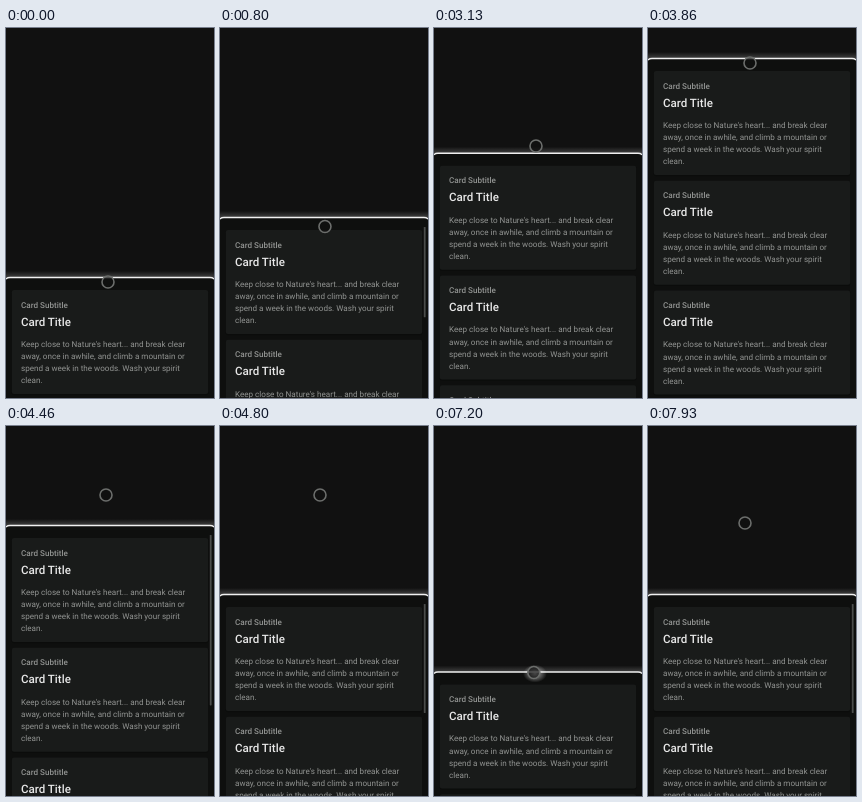
These frames come from a looping animation (208 px wide and 370 px high, 8000 ms). An HTML page:

```html
<!DOCTYPE html>
<html lang="en">
<head>
<meta charset="utf-8">
<title>Bottom sheet</title>
<style>
  html, body { margin: 0; width: 100%; height: 100%; overflow: hidden; background: #111; }
  svg { display: block; width: 208px; height: 370px; }
  text {
    font: 14px Roboto, "Open Sans", sans-serif;
    fill: #929492;
    text-rendering: geometricPrecision;
  }
  .sub { font-weight: 500; }
  .title { font-weight: 500; font-size: 20px; fill: #e8e8e8; }
</style>
</head>
<body>
<svg viewBox="0 0 208 370">
  <defs>
    <linearGradient id="edge" x1="0" y1="0" x2="0" y2="1">
      <stop offset="0" stop-color="#fff" stop-opacity="0"/>
      <stop offset="1" stop-color="#fff" stop-opacity=".2"/>
    </linearGradient>
    <radialGradient id="halo">
      <stop offset="0" stop-color="#fff" stop-opacity=".8"/>
      <stop offset=".45" stop-color="#fff" stop-opacity=".35"/>
      <stop offset="1" stop-color="#fff" stop-opacity="0"/>
    </radialGradient>
    <g id="card">
      <rect x="9.4" y="22.5" width="341.2" height="182" rx="5" fill="#0b0c0b"/>
      <rect x="10" y="22.5" width="340" height="180" rx="4" fill="#191b1a"/>
      <text class="sub" x="26" y="53">Card Subtitle</text>
      <text class="title" x="26" y="84">Card Title</text>
      <text x="26" y="121">Keep close to Nature's heart... and break clear</text>
      <text x="26" y="142">away, once in awhile, and climb a mountain or</text>
      <text x="26" y="163">spend a week in the woods. Wash your spirit</text>
      <text x="26" y="184">clean.</text>
    </g>
  </defs>
  <rect width="208" height="370" fill="#111"/>
  <g id="sheet">
    <rect y="-6" width="208" height="6.5" fill="url(#edge)"/>
    <path d="M0 2Q1 .6 4 .6H204Q207 .6 208 2V400H0Z" fill="#0e0f0e"/>
    <!-- cards are laid out on a 360 px wide screen -->
    <g transform="scale(.5778)">
      <use href="#card"/>
      <use href="#card" y="190"/>
      <use href="#card" y="380"/>
    </g>
    <path d="M0 2Q1 .6 4 .6H204Q207 .6 208 2" fill="none" stroke="#f0f0f0" stroke-width="1.5"/>
    <rect id="bar" x="203.8" y="10" width="1.8" rx=".6" fill="#4b4d4c"/>
    <ellipse id="glow" cx="101" cy="2" rx="12" ry="9" fill="url(#halo)"/>
  </g>
  <circle id="ring" r="6" fill="#111" fill-opacity=".72" stroke="#6c6e6c" stroke-width="1.6"/>
</svg>
<script>
const LOOP = 8000, TICKS = 120, TICK = LOOP / TICKS;
const OPEN = 30, MID = 168, SHUT = 249;
const el = id => document.getElementById(id);
const sheet = el('sheet'), bar = el('bar'), glow = el('glow'), ring = el('ring');

// Moves: [start tick, end tick, new value]; the value rests between moves.
const sheetMoves = [
  [8, 14, MID], [35, 41, 7.5], [41, 46, 145.5], [46, 49.7, OPEN],
  [62, 72, MID], [88, 98.3, SHUT], [107, 115, MID]
];
const ringMoves = [
  [1, 3, 251.5], [8, 14, 180], [18, 23, 174], [27, 30, 169.5],
  [35, 41, 9], [41, 46, 147], [46, 49, 35], [60, 62, 32],
  [62, 66, 69], [72, 84, 172], [88, 98, 262], [102, 105, 256],
  [107, 114, 84], [114, 117, 97]
];
const swayMoves = [[8, 14, 106], [18, 23, 105], [27, 32, 102], [62, 66, 100], [107, 114, 97]];
const barMoves = [[9, 10, 1], [18, 23, 0], [65, 67, 1], [102, 105, 0], [108, 109, 1]];
const presses = [[7, 10], [33, 46], [61, 65], [86, 95], [108, 110]];

const clamp = p => Math.min(1, Math.max(0, p));
const ease = p => p * p * (3 - 2 * p);
const follow = (value, moves, k) => moves.reduce(
  (v, [from, to, next]) => v + (next - v) * ease(clamp((k - from) / (to - from))), value);

function draw(ms) {
  // The picture advances 15 times a second.
  const k = Math.floor((ms % LOOP + 7) / TICK) % TICKS;
  const y = follow(SHUT, sheetMoves, k);
  sheet.setAttribute('transform', `translate(0 ${y.toFixed(2)})`);
  bar.setAttribute('height', Math.max(0, 109 - 0.89 * (y - MID)));
  bar.setAttribute('opacity', follow(0, barMoves, k));
  glow.setAttribute('opacity', presses.some(([from, to]) => k >= from && k < to) ? 1 : 0);
  ring.setAttribute('cx', follow(102, swayMoves, k));
  ring.setAttribute('cy', follow(254, ringMoves, k));
}

const start = performance.now();
function loop() {
  draw(performance.now() - start);
  requestAnimationFrame(loop);
}
loop();
</script>
</body>
</html>
```
